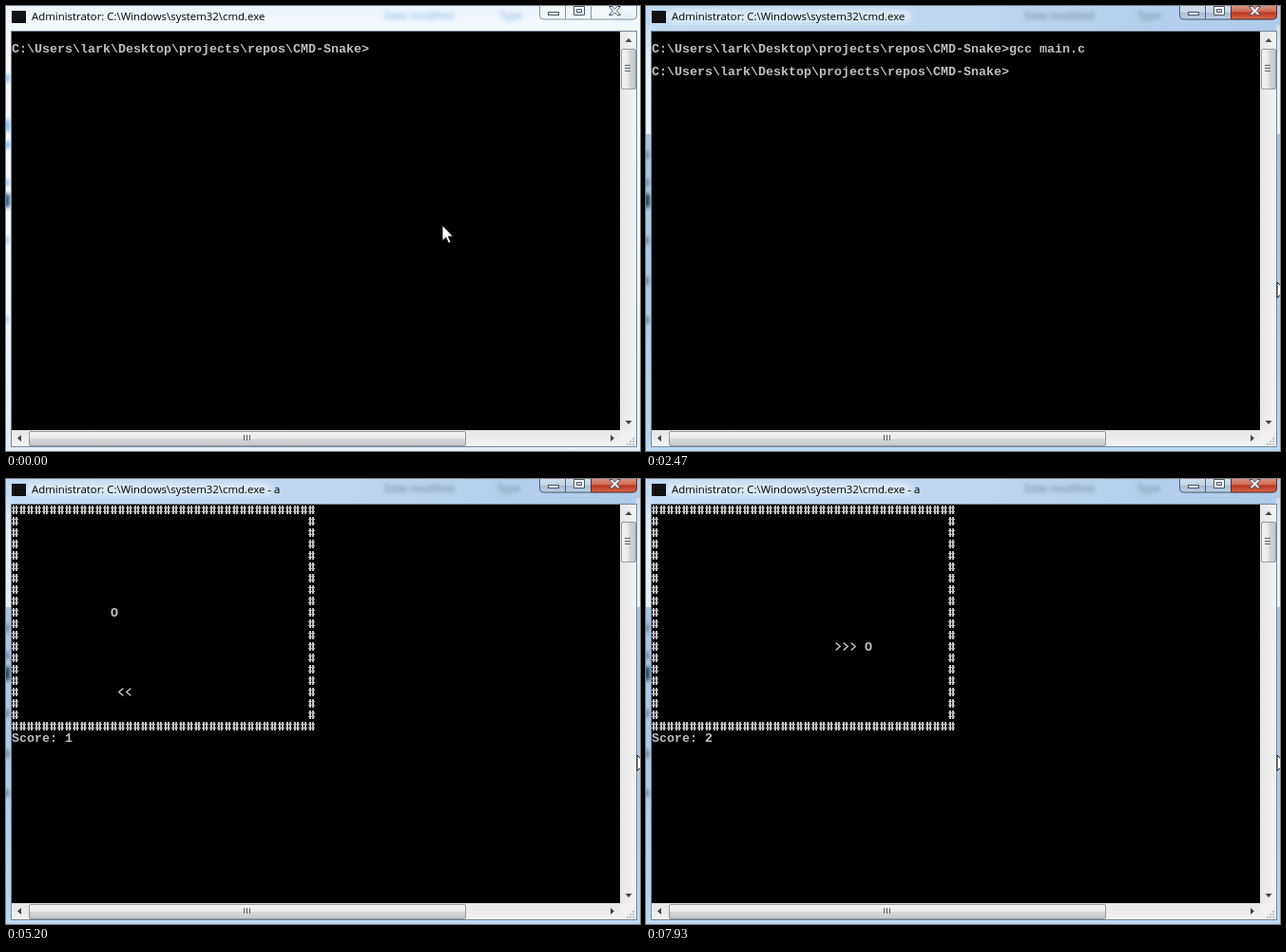
These frames come from a looping animation (667x469 px, 8000 ms). An HTML page:

```html
<!DOCTYPE html>
<html lang="en">
<head>
<meta charset="utf-8">
<title>Console snake</title>
<style>
html, body { margin: 0; width: 100%; height: 100%; overflow: hidden; background: #e9f2fa; }
svg { display: block; width: 100vw; height: 100vh; }
#lines text { font: bold 13.33px "Liberation Mono", monospace; white-space: pre; fill: #c0c0c0; }
#title { font: 11.4px "Open Sans", "Noto Sans", sans-serif; fill: #000; white-space: pre; }
.behind { font: 11px "Open Sans", "Noto Sans", sans-serif; }
</style>
</head>
<body>
<svg viewBox="0 0 667 469" preserveAspectRatio="none">
  <defs>
    <linearGradient id="idle" x2="0" y2="1">
      <stop offset="0" stop-color="#eaf3fb"/><stop offset=".06" stop-color="#f6fafd"/>
      <stop offset=".5" stop-color="#f4f9fd"/><stop offset="1" stop-color="#e3eef8"/>
    </linearGradient>
    <linearGradient id="glass">
      <stop offset="0" stop-color="#c3dcf5"/><stop offset=".5" stop-color="#bdd6f0"/><stop offset="1" stop-color="#adcaea"/>
    </linearGradient>
    <linearGradient id="side" x2="0" y2="1">
      <stop offset="0" stop-color="#c8def4"/><stop offset=".08" stop-color="#e6f0f9"/>
      <stop offset=".255" stop-color="#e9f2fa"/><stop offset=".257" stop-color="#a9c3e0"/>
      <stop offset=".7" stop-color="#b1cdeb"/><stop offset="1" stop-color="#bbd7f3"/>
    </linearGradient>
    <linearGradient id="pane" x2="0" y2="1">
      <stop offset="0" stop-color="#d3e0ee"/><stop offset=".5" stop-color="#c3d4e6"/>
      <stop offset=".52" stop-color="#a5bbd3"/><stop offset="1" stop-color="#bdd1e6"/>
    </linearGradient>
    <linearGradient id="red" x2="0" y2="1">
      <stop offset="0" stop-color="#dd9a8c"/><stop offset=".48" stop-color="#cd6650"/>
      <stop offset=".52" stop-color="#b8351c"/><stop offset="1" stop-color="#d4694b"/>
    </linearGradient>
    <linearGradient id="thumbV">
      <stop offset="0" stop-color="#f5f5f5"/><stop offset=".5" stop-color="#e8e8ea"/>
      <stop offset=".52" stop-color="#d7d8da"/><stop offset="1" stop-color="#c5c6c9"/>
    </linearGradient>
    <linearGradient id="thumbH" href="#thumbV" x2="0" y2="1"/>
    <linearGradient id="trackV"><stop offset="0" stop-color="#e6e6e6"/><stop offset="1" stop-color="#f3f3f3"/></linearGradient>
    <linearGradient id="trackH" href="#trackV" x2="0" y2="1"/>
    <filter id="soft" x="-30%" y="-100%" width="160%" height="300%"><feGaussianBlur stdDeviation="2.2"/></filter>
    <pattern id="hash" x="6" y="27" width="8" height="12" patternUnits="userSpaceOnUse">
      <path d="M1 1h2v9h-2zM4 1h2v9h-2zM0 3h7v1h-7zM0 7h7v1h-7z" fill="#c0c0c0" shape-rendering="crispEdges"/>
    </pattern>
  </defs>

  <g>
    <rect width="667" height="469" fill="url(#idle)"/>
    <g class="behind" filter="url(#soft)" fill="#7fb5e6">
      <text x="398" y="14">Date modified</text><text x="519" y="14">Type</text><text x="640" y="14">Size</text>
      <path d="M-2 72h5v8h-5zM-2 120h6v12h-6zM-2 143h6v7h-6zM-2 183h5v6h-5zM-2 244h4v6h-4zM-2 328h4v5h-4z"/>
      <path d="M-2 198h6v14h-6z" fill="#1d4a7a"/>
    </g>
  </g>
  <g id="active">
    <rect width="667" height="469" fill="url(#glass)"/>
    <path d="M0 20H6V469H0zM663 20h4V469h-4z" fill="url(#side)"/>
    <rect y="465" width="667" height="4" fill="#bbd7f3"/>
    <rect x="22" y="4" width="258" height="14" rx="7" fill="#fff" opacity=".4" filter="url(#soft)"/>
    <g class="behind" filter="url(#soft)" fill="#6c8199">
      <text x="398" y="14">Date modified</text><text x="517" y="14">Type</text>
      <path d="M-2 198h6v14h-6z" fill="#1f3550"/>
      <path d="M-2 153h5v8h-5zM-2 182h5v8h-5zM-2 243h5v8h-5zM-2 285h5v9h-5zM-2 327h5v8h-5z"/>
    </g>
  </g>

  <g stroke="#8796a6" fill="#f3f8fc" fill-opacity=".6">
    <path d="M561.5 0V10q0 4 4 4H659.5q4 0 4-4V0"/><path d="M588.5 0V14M615.5 0V14"/>
  </g>
  <g id="buttons" stroke="#50657c">
    <path d="M561.5 -1V10q0 4 4 4H588.5V-1z" fill="url(#pane)"/>
    <path d="M588.5 -1H615.5V14H588.5z" fill="url(#pane)"/>
    <path d="M615.5 -1H663.5V10q0 4-4 4H615.5z" fill="url(#red)" stroke="#5c2a28"/>
  </g>
  <g fill="#fff" stroke="#4b5563">
    <rect x="570.5" y="6.5" width="11" height="3"/>
    <path fill-rule="evenodd" d="M597.5 .5h11v9h-11zM600.5 3.5h5v3h-5z"/>
    <path d="M634.5 .5h3.5l2.5 2.8 2.5-2.8h3.5l-4 4.7 4 4.3h-3.5l-2.5-2.6-2.5 2.6h-3.5l4-4.3z"/>
  </g>
  <rect x="6" y="5" width="15" height="13" fill="#111"/>
  <text id="title" x="27" y="15"></text>

  <rect x="5" y="26" width="659" height="439" fill="#75879a"/>
  <rect x="6" y="27" width="640" height="420"/>
  <rect x="646" y="27" width="17" height="420" fill="url(#trackV)"/>
  <rect x="6" y="447" width="640" height="17" fill="url(#trackH)"/>
  <rect x="646" y="447" width="17" height="17" fill="#f0f0f0"/>
  <rect x="647.5" y="45.5" width="15" height="42" rx="1.5" fill="url(#thumbV)" stroke="#979797"/>
  <rect x="24.5" y="448.5" width="459" height="15" rx="1.5" fill="url(#thumbH)" stroke="#979797"/>
  <path d="M651 62.5h6M651 65.5h6M651 68.5h6M250.5 452v6M253.5 452v6M256.5 452v6" stroke="#60656b"/>
  <path d="M651.5 38h7l-3.5-4zM651.5 437h7l-3.5 4zM16 452v7l-4-3.5zM636 452v7l4-3.5z" fill="#3f4449"/>
  <path d="M659 455h2v2h-2zM656 458h2v2h-2zM659 458h2v2h-2zM653 461h2v2h-2zM656 461h2v2h-2zM659 461h2v2h-2z" fill="#bcc0c4"/>

  <path id="wall" d="M6 27H326V267H6zM14 39V255H318V39z" fill="url(#hash)" fill-rule="evenodd"/>
  <g id="lines"></g>
  <path id="snake" fill="none" stroke="#c0c0c0" stroke-width="1.4"/>
  <rect id="caret" width="8" height="3" fill="#c0c0c0"/>
  <path id="mouse" d="M0 0V16.5L3.8 13 6.5 19 9 18 6.4 12H11.5z" fill="#fff" stroke="#000" stroke-width=".9"/>
</svg>
<script>
const LOOP = 8000, FPS = 15, ROWS = 21;
const PROMPT = 'C:\\Users\\lark\\Desktop\\projects\\repos\\CMD-Snake>';
const TITLE = 'Administrator: C:\\Windows\\system32\\cmd.exe';
const COMMAND = 'gcc main.c';
const KEYS = [[14, 1], [18, 2], [20, 3], [23, 5], [25, 7], [26, 8], [29, 9], [31, 10]]; // tick, letters typed
const CARETS = [[2, 9, 47, 1], [17, 18, 48, 1], [25, 26, 54, 1], [33, 37, 0, 2]]; // from, to, column, row
const ENTER = 32, DONE = 37, RUN = 42, GAME = 43;

// One letter per tick: a move, E for a meal, a dot for a pause.
const MOVES = 'RR.RRR.RRD.DDD.DL.LLL.LLL.LLL.DELLLU.UUL.LU.UUUURDE.DD.DDRR.RR.RRR.RRR.UR.RR';
const DIRS = {
  R: [1, 0, [1.7, 1.6, 6.3, 5.5, 1.7, 9.4]],
  L: [-1, 0, [5.4, 1.6, .8, 5.5, 5.4, 9.4]],
  U: [0, -1, [.7, 3.8, 3.5, .7, 6.3, 3.8]],
  D: [0, 1, [.7, 4.3, 3.5, 9.4, 6.3, 4.3]]
};
const FOOD = [[17, 16], [13, 9], [28, 12]];

const $ = id => document.getElementById(id);
const px = col => 6 + col * 8;
const py = row => 27 + row * 12;
const show = (id, on) => $(id).setAttribute('visibility', on ? 'visible' : 'hidden');
const rows = Array.from({ length: ROWS }, (_, r) => {
  const el = document.createElementNS('http://www.w3.org/2000/svg', 'text');
  el.setAttribute('x', 6);
  el.setAttribute('y', py(r) + 10);
  return $('lines').appendChild(el);
});

function play(tick) {
  let x = 20, y = 10, score = 0;
  let body = [[x, y, 'R']];
  for (const m of MOVES.slice(0, tick - GAME)) {
    if (m === 'E') score++;
    if (!DIRS[m]) continue;
    x += DIRS[m][0];
    y += DIRS[m][1];
    body = [[x, y, m], ...body].slice(0, score + 1);
  }
  return { body, score };
}

function board({ body, score }) {
  const lines = Array(ROWS).fill('');
  const [fx, fy] = FOOD[score];
  if (body[0][0] !== fx || body[0][1] !== fy) lines[fy] = ' '.repeat(fx) + 'O';
  lines[ROWS - 1] = 'Score: ' + score;
  return lines;
}

function shell(tick) {
  const typed = KEYS.reduce((n, [at, count]) => tick >= at ? count : n, 0);
  const lines = ['', PROMPT + COMMAND.slice(0, typed)];
  if (tick >= DONE) lines.push('', PROMPT + (tick >= RUN ? 'a' : ''));
  return lines;
}

function glyph([col, row, dir]) {
  const p = DIRS[dir][2].map((v, i) => v + (i % 2 ? py(row) : px(col)));
  return `M${p[0]} ${p[1]}L${p[2]} ${p[3]}L${p[4]} ${p[5]}`;
}

let last = -1;
function render(ms) {
  const tick = Math.floor((ms % LOOP + 4) * FPS / 1000);
  if (tick === last) return;
  last = tick;

  const game = tick >= GAME && play(tick);
  const lines = game ? board(game) : shell(tick);
  rows.forEach((el, r) => { el.textContent = lines[r] || ''; });
  show('wall', game);
  $('snake').setAttribute('d', game ? game.body.map(glyph).join('') : '');
  $('title').textContent = TITLE +
    (game ? ' - a' : tick >= ENTER && tick < DONE ? ' - gcc  main.c' : '');

  const caret = CARETS.find(([from, to]) => tick >= from && tick < to);
  show('caret', caret);
  if (caret) {
    $('caret').setAttribute('x', px(caret[2]));
    $('caret').setAttribute('y', py(caret[3]) + 9);
  }

  const focus = Math.min(1, Math.max(0, (tick - 1) / 4));
  $('active').setAttribute('opacity', focus);
  $('buttons').setAttribute('opacity', focus);
  $('mouse').setAttribute('transform', `translate(${459 + 205 * focus} ${231 + 60 * focus})`);
}

const start = performance.now();
function loop() {
  render(performance.now() - start);
  requestAnimationFrame(loop);
}
loop();
</script>
</body>
</html>
```
